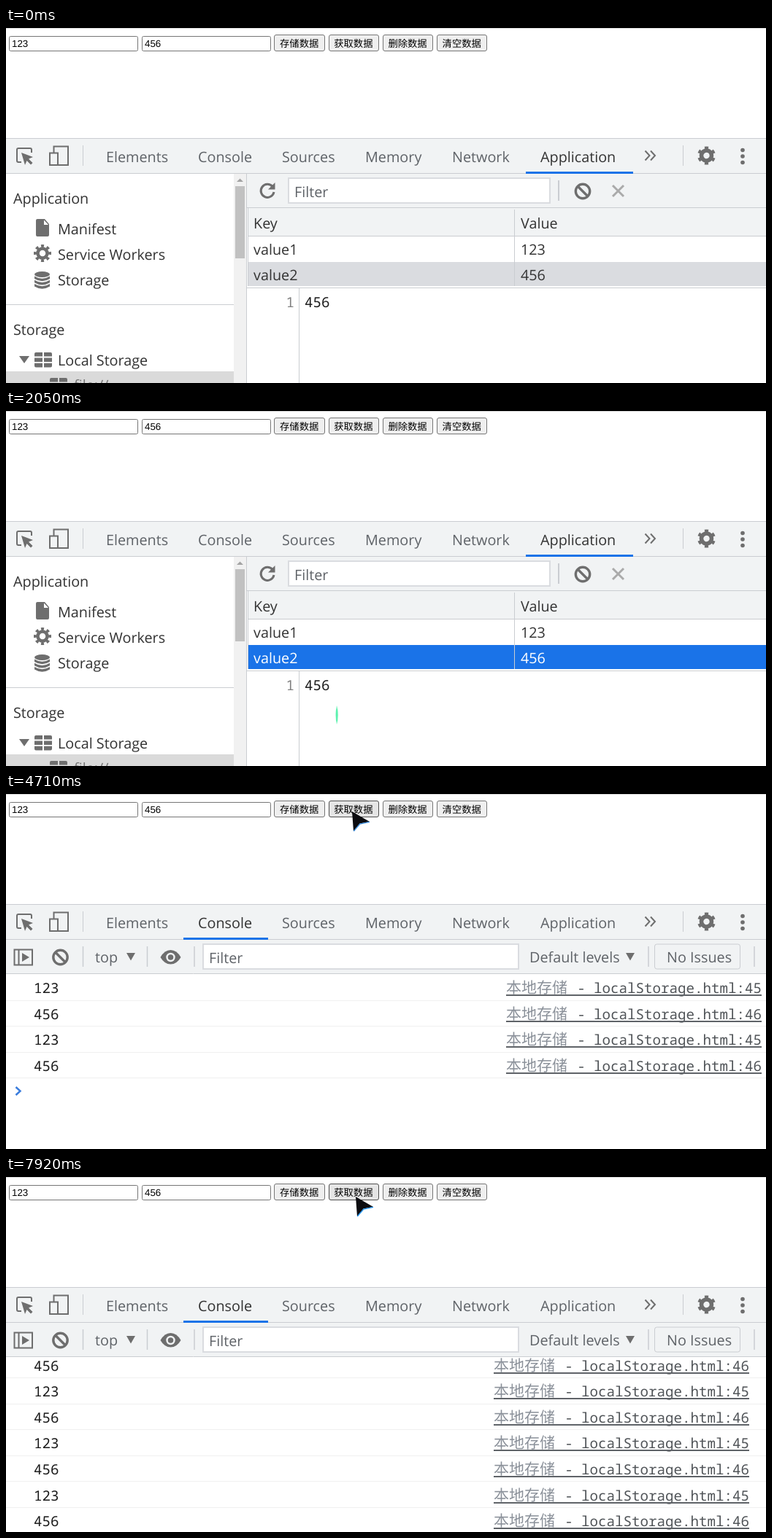
Animation, 1041 px wide and 487 px high, one loop 7990 ms. Source, as an HTML page:

```html
<!DOCTYPE html>
<html lang="zh">
<head>
<meta charset="utf-8">
<title>localStorage demo</title>
<style>
html, body { margin: 0; width: 100%; height: 100%; overflow: hidden; background: #fff; }
svg { display: block; position: absolute; left: 0; top: 0; }
text { font: 19.8px "Open Sans", "Noto Sans", sans-serif; fill: #333; white-space: pre; text-rendering: geometricPrecision; }
.dim { fill: #5f6368; }
.mono { font: 500 19.17px "Noto Sans Mono", "DejaVu Sans Mono", monospace; fill: #1c1c1c; }
.mono.dim { fill: #505458; }
.cjk { font: 300 21px "Noto Sans CJK SC", "Noto Sans CJK", sans-serif; fill: #8a9099; }
.field { font: 13.33px "Liberation Sans", Arial, sans-serif; fill: #000; }
.btn { font: 13.33px "Noto Sans CJK SC", "Noto Sans CJK", sans-serif; fill: #000; }
.bar { fill: #f1f3f4; }
.rule { stroke: #cacdd1; fill: none; }
.ico { fill: #6e6e6e; }
.line { fill: none; stroke: #6e6e6e; stroke-width: 2; }
.box { fill: #fff; stroke: #dadce0; stroke-width: 2; }
.control { fill: #fff; stroke: #767676; }
.push { fill: #efefef; stroke: #767676; }

/* hard changes, all on the same clock */
.step { animation: 7.99s step-end infinite; }
.from { opacity: 0; }
@keyframes app { 0% { opacity: 1 } 29.79% { opacity: 0 } }
@keyframes con { 0% { opacity: 0 } 29.79% { opacity: 1 } }
@keyframes tabApp { 0% { fill: #333 } 29.79% { fill: #5f6368 } }
@keyframes tabCon { 0% { fill: #5f6368 } 29.79% { fill: #333 } }
@keyframes row1 { 0%, 19.52% { fill: #fff } 15.02% { fill: #1a73e8 } }
@keyframes row1Text { 0%, 19.52% { fill: #333 } 15.02% { fill: #fff } }
@keyframes row2 { 0% { fill: #dadce0 } 11.26%, 19.52% { fill: #1a73e8 } 15.02% { fill: #f5f5f5 } }
@keyframes row2Text { 0%, 15.02% { fill: #333 } 11.26%, 19.52% { fill: #fff } }
@keyframes edit1 { 0%, 19.52% { opacity: 0 } 15.02% { opacity: 1 } }
@keyframes edit2 { 0%, 19.52% { opacity: 1 } 15.02% { opacity: 0 } }
@keyframes logs1 { 0% { opacity: 0 } 52.57% { opacity: 1 } }
@keyframes logs2 { 0% { opacity: 0 } 74.47% { opacity: 1 } }
@keyframes logs3 { 0% { opacity: 0 } 86.36% { opacity: 1 } }
@keyframes prompt {
  0% { transform: translateY(0) } 52.57% { transform: translateY(71px) }
  74.47% { transform: translateY(142px) } 86.36% { transform: translateY(213px) }
}
@keyframes scroll { 0% { transform: translateY(0) } 86.36% { transform: translateY(-43px) } }
@keyframes links { 0% { transform: translateX(0) } 86.36% { transform: translateX(-17px) } }
@keyframes caret { 0%, 29.79%, 42.3% { opacity: 1 } 36.05%, 48.56% { opacity: 0 } }
@keyframes push {
  0%, 92% { fill: #efefef; stroke: #767676 }
  45.8%, 52.6%, 74.5%, 86.1%, 98.5% { fill: #e5e5e5; stroke: #4f4f4f }
  51.1%, 72.7%, 83.7% { fill: #f5f5f5; stroke: #8d8d8d }
}
@keyframes press {
  0%, 12%, 15.4%, 19.8%, 30%, 52.6%, 74.5%, 86.1% { opacity: 0 }
  10.5%, 13.9%, 18.3%, 28.7%, 51.1%, 72.7%, 83.7% { opacity: .55 }
}
@keyframes arrow { 0%, 20.2% { opacity: 0 } 10.2%, 26.2% { opacity: 1 } }
@keyframes beam { 0%, 10.2%, 26.2% { opacity: 0 } 7.38%, 20.2% { opacity: 1 } }
@keyframes edge {
  0% { stroke: #70307a } 42% { stroke: #9030f0 } 52% { stroke: #3a8ee0 }
  83% { stroke: #8030d0 } 90% { stroke: #1a90f0 }
}

#pointer { animation: travel 7.99s linear infinite; }
@keyframes travel {
  0%, 7.38% { transform: translate(804px, 440px) }
  9.14% { transform: translate(666px, 370px) }
  10.5% { transform: translate(560px, 338px) }
  12% { transform: translate(555px, 336px) }
  13.9%, 15.4% { transform: translate(540px, 306px) }
  18%, 19.8% { transform: translate(530px, 336px) }
  20.65% { transform: translate(535px, 365px) }
  21.5% { transform: translate(556px, 403px) }
  22.8% { transform: translate(578px, 447px) }
  25.66% { transform: translate(455px, 418px) }
  26.53% { transform: translate(290px, 325px) }
  27.4% { transform: translate(246px, 257px) }
  28.5% { transform: translate(296px, 180px) }
  37.5% { transform: translate(300px, 182px) }
  40% { transform: translate(412px, 125px) }
  43.18% { transform: translate(424px, 65px) }
  45.8% { transform: translate(472px, 26px) }
  46.7%, 91.4% { transform: translate(474px, 24px) }
  93.1% { transform: translate(503px, 195px) }
  94.9% { transform: translate(555px, 343px) }
  97.4% { transform: translate(505px, 190px) }
  99.12%, 100% { transform: translate(479px, 27px) }
}
</style>
</head>
<body>
<svg width="1041" height="487" viewBox="0 0 1041 487">
  <defs>
    <clipPath id="logArea"><rect y="247" width="1041" height="240"/></clipPath>
    <g id="ban"><circle r="9.7" class="line" style="stroke-width:3.4"/><path d="M-6.5-6.5 6.5 6.5" class="line" style="stroke-width:3.4"/></g>
    <g id="grid" class="ico">
      <path d="M2 0H11V5.6H0V2Q0 0 2 0ZM13 0H22Q24 0 24 2V5.6H13ZM0 7.4H11V13H0ZM13 7.4H24V13H13ZM0 14.8H11V20.4H2Q0 20.4 0 18.4ZM13 14.8H24V18.4Q24 20.4 22 20.4H13Z"/>
    </g>
  </defs>

  <!-- page -->
  <path d="M0 .5H1041" stroke="#dadada"/>
  <rect class="control" x="4.5" y="11.5" width="176" height="20" rx="2"/>
  <rect class="control" x="186.5" y="11.5" width="176" height="20" rx="2"/>
  <text class="field" x="8" y="26">123</text>
  <text class="field" x="190" y="26">456</text>
  <g id="buttons"></g>

  <!-- devtools tabs -->
  <rect class="bar" y="152" width="1041" height="47"/>
  <path class="rule" d="M0 151.5H1041M0 199.5H1041M105.5 161V189M927.5 161V189"/>
  <path class="line" d="M21 184H17Q15 184 15 182V167Q15 165 17 165H33Q35 165 35 167V171"/>
  <path class="ico" d="M21 171 37 177 31 179.500 36.500 185 34 187.500 28.500 182 26 188Z"/>
  <path class="line" d="M65.500 171V162.500H85V188H71M60 171.500H71V188H60Z"/>
  <g id="tabs"></g>
  <path class="line" d="M875.500 168.500 881.500 175 875.500 181.500M883 168.500 889 175 883 181.500"/>
  <g transform="translate(959.500 175) rotate(30)">
    <circle class="line" r="7" style="stroke-width:5.600"/>
    <circle class="line" r="10.500" pathLength="6" stroke-dasharray=".44 .56" stroke-dashoffset=".22" style="stroke-width:4"/>
  </g>
  <g class="ico"><circle cx="1009" cy="167.500" r="2.800"/><circle cx="1009" cy="176" r="2.800"/><circle cx="1009" cy="184.500" r="2.800"/></g>

  <!-- application panel -->
  <g class="step" style="animation-name:app">
    <rect x="712" y="197" width="147" height="3" fill="#1a73e8"/>
    <rect x="312" y="200" width="17" height="287" fill="#f1f1f1"/>
    <rect x="314" y="217" width="13" height="99" fill="#c1c1c1"/>
    <path d="M316 211 320.500 206.500 325 211Z" fill="#a3a3a3"/>
    <rect y="471" width="312" height="16" fill="#dadada"/>
    <path class="rule" d="M0 379.500H312M329.500 200V487"/>
    <text x="10" y="241">Application</text>
    <text x="71" y="283">Manifest</text>
    <text x="71" y="318">Service Workers</text>
    <text x="71" y="353">Storage</text>
    <text x="10" y="421">Storage</text>
    <text x="71" y="463">Local Storage</text>
    <text x="93" y="497" style="fill:#777">file://</text>
    <path class="ico" d="M43 262H53L59 269V284Q59 286 57 286H43Q41 286 41 284V264Q41 262 43 262ZM52 263.500V270H58Z"/>
    <g transform="translate(50 309)">
      <circle class="line" r="6.500" style="stroke-width:4.500"/>
      <circle class="line" r="10" pathLength="8" stroke-dasharray=".5 .5" stroke-dashoffset=".25" style="stroke-width:4"/>
    </g>
    <g class="ico">
      <ellipse cx="49.500" cy="338" rx="10.500" ry="4"/>
      <path id="disk" d="M39 340.500Q49.500 347 60 340.500V344Q49.500 350.500 39 344Z"/>
      <use href="#disk" y="5.300"/><use href="#disk" y="10.400"/>
      <path d="M18 450H32L25 460Z"/>
    </g>
    <use href="#grid" x="39" y="445"/>
    <use href="#grid" x="60" y="480"/>

    <rect class="bar" x="330" y="200" width="711" height="46"/>
    <path class="line" style="stroke-width:3" d="M365 217.500A9 9 0 1 0 367 225"/>
    <path class="ico" d="M368.500 212V221.500H359Z"/>
    <rect class="box" x="387" y="206" width="358" height="34"/>
    <text class="dim" x="395" y="232">Filter</text>
    <path class="rule" d="M757 209V237" stroke-width="2"/>
    <use href="#ban" x="790" y="224"/>
    <path d="M831 216 846 231M846 216 831 231" stroke="#aaa" stroke-width="3"/>

    <rect class="bar" x="332" y="247" width="709" height="38"/>
    <rect class="step" x="332" y="286" width="709" height="35" style="animation-name:row1"/>
    <rect class="step" x="332" y="321" width="709" height="33" style="animation-name:row2"/>
    <path class="rule" d="M330 246.500H1041M331.500 247V354M332 285.500H1041M696.500 249V354M330 356.500H1041M401.500 357V487"/>
    <text x="339" y="275">Key</text>
    <text x="705" y="275">Value</text>
    <g id="cells"></g>
    <text class="mono" x="395" y="383" text-anchor="end" style="fill:#808080">1</text>
    <text class="mono step" x="409" y="383" style="animation-name:edit1">123</text>
    <text class="mono step" x="409" y="383" style="animation-name:edit2">456</text>
  </g>

  <!-- console panel -->
  <g class="step from" style="animation-name:con">
    <rect x="243" y="197" width="116" height="3" fill="#1a73e8"/>
    <rect class="bar" y="200" width="1041" height="46"/>
    <path class="rule" d="M0 246.500H1041"/>
    <path class="rule" stroke-width="1.500" d="M105.500 209V237M193.500 209V237M258 209V237M880 209V237M1025 209V237"/>
    <path class="line" d="M11.500 213.500H36V234.500H11.500ZM17.500 213V235"/>
    <path class="ico" d="M22 218V230L32 224ZM165 218H177L171 228.500ZM849 218H861L855 228.500Z"/>
    <use href="#ban" x="74.500" y="224"/>
    <text class="dim" x="122" y="231">top</text>
    <path class="ico" d="M211.500 224Q217 214 225.500 214T239.500 224Q234 233.500 225.500 233.500T211.500 224Z"/>
    <circle cx="225.500" cy="224" r="5" fill="none" stroke="#f1f3f4" stroke-width="2.500"/>
    <rect class="box" x="270" y="206" width="432" height="34"/>
    <text class="dim" x="278" y="232">Filter</text>
    <text class="dim" x="717" y="231">Default levels</text>
    <rect class="rule" x="888.500" y="206" width="117" height="34" rx="3"/>
    <text class="dim" x="905" y="231">No Issues</text>
    <g clip-path="url(#logArea)">
      <g class="step" style="animation-name:scroll">
        <g id="logs"></g>
        <g class="step" style="animation-name:prompt">
          <path d="M13.500 331 19.500 336.500 13.500 342" fill="none" stroke="#3b7ddd" stroke-width="2.500"/>
        </g>
      </g>
    </g>
    <path class="step" style="animation-name:caret" d="M37.500 325V349" stroke="#000"/>
  </g>

  <!-- mouse -->
  <g id="pointer">
    <circle class="step from" style="animation-name:press" r="12" fill="#fff000"/>
    <g class="step from" style="animation-name:arrow">
      <path d="M0 0 24 14 10.500 16.500 2 27Z" fill="#0c0c10"/>
      <path class="step" style="animation-name:edge" d="M24 14.300 10.800 17 2.300 27" fill="none" stroke-width="1.300"/>
    </g>
    <path class="step from" style="animation-name:beam" d="M0-13Q3 0 0 13Q-3 0 0-13Z" fill="#4ff0a8"/>
  </g>
</svg>
<script>
const fill = (id, items, draw) => {
  document.getElementById(id).innerHTML = items.map(draw).join('');
};
const step = name => name ? `class="step" style="animation-name:${name}"` : '';

fill('buttons', ['存储数据', '获取数据', '删除数据', '清空数据'], (label, i) => {
  const x = 367.4 + i * 74.2, left = Math.round(x), right = Math.round(x + 69.2);
  const cls = i === 1 ? 'push step' : 'push';
  return `<rect class="${cls}" style="animation-name:push"
    x="${left + .5}" y="9.5" width="${right - left - 1}" height="22" rx="2.5"/>
    <text class="btn" x="${x + 7.6}" y="25.5">${label}</text>`;
});

fill('tabs', [['Elements', 137], ['Console', 263, 'tabCon'], ['Sources', 378], ['Memory', 492],
  ['Network', 611], ['Application', 732, 'tabApp']], ([label, x, anim]) =>
  `<text ${step(anim) || 'class="dim"'} x="${x}" y="184">${label}</text>`);

fill('cells', [['value1', '123'], ['value2', '456']], (cells, i) => cells.map((value, col) =>
  `<text ${step(`row${i + 1}Text`)} x="${col ? 705 : 339}" y="${311 + 35 * i}">${value}</text>`).join(''));

// Each click logs one pair of lines.
fill('logs', [...Array(8).keys()], i => {
  const y = Math.round(273 + 35.6 * i), odd = i % 2, pair = i >> 1;
  return `<g ${pair ? step('logs' + pair) : ''}>
    <path d="M0 ${Math.floor(283.2 + 35.5 * i) + .5}H1041" stroke="#f0f0f0"/>
    <text class="mono" x="38" y="${y}">${odd ? 456 : 123}</text>
    <g ${step('links')}>
      <text class="cjk" x="685" y="${y}">本地存储</text>
      <text class="mono dim" x="1035" y="${y}" text-anchor="end">- localStorage.html:${45 + odd}</text>
      <path d="M685 ${y + 3}H1035" stroke="#5f6368" stroke-width="2"/>
    </g></g>`;
});
</script>
</body>
</html>
```
